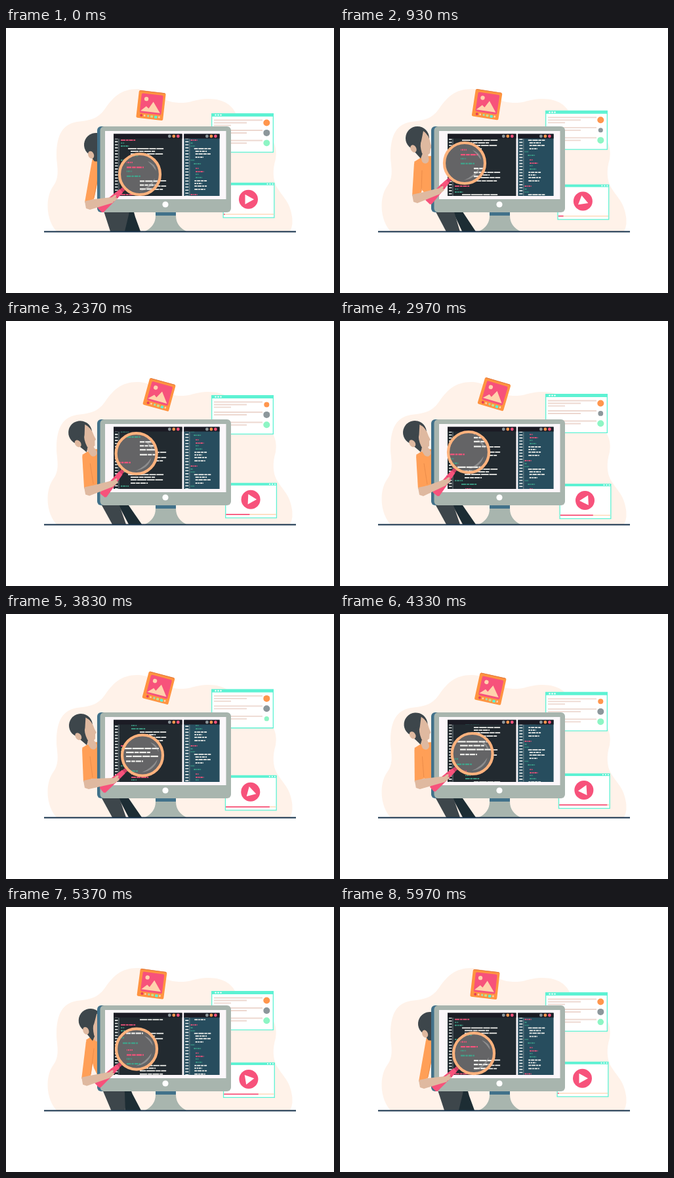
These frames come from a looping animation (500x404 px, 6 s). An HTML page with a canvas:

```html
<!DOCTYPE html>
<html>
<head>
<meta charset="utf-8">
<style>
html, body { margin: 0; width: 100%; height: 100%; overflow: hidden; background: #fff; }
canvas { display: block; width: 500px; height: 404px; }
</style>
</head>
<body>
<canvas id="stage" width="500" height="404"></canvas>
<script>
const canvas = document.getElementById('stage');
const c = canvas.getContext('2d');
const LOOP = 6000, PERIOD = 83, TAU = Math.PI * 2;
const PINK = '#f7527b', ORANGE = '#ff964d', MINT = '#5df2d3', SKIN = '#dfb9a0', HAIR = '#3d464b',
  TEAL = '#3fa58c', WHITE = '#f2f2ee', GREY = '#8c979b', PEACH = '#ffd2ad', NAVY = '#1d2d34',
  BODY = '#a8b5ae', SIDE = '#41718a', SHIRT = '#ff9f57';

// Code lines: offset, colour, left, right
const code = [
  [0, PINK, 175, 198], [4.5, TEAL, 175, 181], [9, TEAL, 175, 188],
  [13, WHITE, 186, 241], [17, WHITE, 190, 228], [21, WHITE, 190, 240], [26, WHITE, 190, 217],
  [30.5, TEAL, 175, 188], [36, TEAL, 185, 209], [43, PINK, 191, 201], [48, PINK, 191, 218],
  [52, TEAL, 191, 200], [57, TEAL, 191, 213],
  [62, WHITE, 204, 245], [66, WHITE, 204, 229], [70, WHITE, 204, 245], [75, WHITE, 204, 240]
];

// Pose: time, lens x y, handle angle, head x y, head tilt, shoulder x y, elbow x y, lean
const poses = [
  [0, 204, 223, 138, 137, 178, 5, 138, 206, 127, 270, 0],
  [930, 190, 206, 133, 118, 168, 0, 120, 209, 117, 260, .9],
  [1830, 201, 206, 131, 113, 170, -9, 123, 209, 125, 259, 1],
  [2970, 196, 200, 128, 114, 170, -8, 123, 209, 126, 260, 1],
  [3830, 208, 215.5, 139, 114, 170, -8, 123, 209, 125, 260, 1],
  [4830, 195, 210, 136.5, 119, 168, 0, 120, 209, 118, 261, .9]
];

const ease = x => (1 - Math.cos(Math.PI * Math.min(1, Math.max(0, x)))) / 2;
const mix = (a, b, k) => a + (b - a) * k;

function keyAt(i) {
  const n = poses.length, p = poses[(i + n) % n];
  return [p[0] + Math.floor(i / n) * LOOP, ...p.slice(1)];
}

// Smooth periodic curve through the poses
function poseAt(t) {
  let i = poses.length - 1;
  while (poses[i][0] > t) i--;
  const [a, b, d, e] = [i - 1, i, i + 1, i + 2].map(keyAt);
  const h = d[0] - b[0], u = (t - b[0]) / h, u2 = u * u, u3 = u2 * u;
  return b.slice(1).map((v, j) => {
    const k = j + 1;
    const m0 = (d[k] - a[k]) / (d[0] - a[0]) * h, m1 = (e[k] - b[k]) / (e[0] - b[0]) * h;
    return (2 * u3 - 3 * u2 + 1) * v + (u3 - 2 * u2 + u) * m0 + (3 * u2 - 2 * u3) * d[k] + (u3 - u2) * m1;
  });
}

function rect(x, y, w, h, fill, r = 0) {
  c.fillStyle = fill;
  c.beginPath();
  c.roundRect(x, y, w, h, r);
  c.fill();
}
function dot(x, y, r, fill) {
  c.fillStyle = fill;
  c.beginPath();
  c.arc(x, y, r, 0, TAU);
  c.fill();
}
function poly(fill, ...p) {
  c.fillStyle = fill;
  c.beginPath();
  for (let i = 0; i < p.length; i += 2) c.lineTo(p[i], p[i + 1]);
  c.closePath();
  c.fill();
}
function line(color, w, x1, y1, x2, y2, cap = 'butt') {
  c.strokeStyle = color;
  c.lineWidth = w;
  c.lineCap = cap;
  c.beginPath();
  c.moveTo(x1, y1);
  c.lineTo(x2, y2);
  c.stroke();
}
function group(x, y, deg, draw) {
  c.save();
  c.translate(x, y);
  c.rotate(deg * Math.PI / 180);
  draw();
  c.restore();
}
function clipTo(shape, draw) {
  c.save();
  c.beginPath();
  shape();
  c.clip();
  draw();
  c.restore();
}

function backdrop() {
  c.fillStyle = '#fff2e9';
  c.fill(new Path2D(`M77 310 C60 291 60 257 72 241 C84 225 76 207 77 190 C78 163 86 147 108 143
    C132 141 142 136 151 123 C164 104 177 92 203 93 C229 95 234 113 264 114 C282 115 287 108 309 108
    C333 108 346 119 351 132 C358 150 372 152 386 157 C408 164 414 181 411 200 C406 216 407 231 412 241
    C421 257 431 263 435 282 Q439 299 433 310 Z`));
}

function windowFrame(x, y, w, h, bar) {
  rect(x, y, w, h, MINT);
  rect(x + 1.3, y + bar, w - 2.6, h - bar - 1.3, '#fff');
}

function listWindow(y, t) {
  windowFrame(313, y, 95, 60, 5);
  for (const x of [319.5, 323.5, 327.5]) dot(x, y + 2.6, 1.2, '#fff');
  const phase = t % 2000 / 2000;
  const dip = at => {
    const d = Math.abs((phase - at + 1.5) % 1 - .5);
    return d < .12 ? ease(1 - d / .12) : 0;
  };
  [[ORANGE, .18, 1], [GREY, .44, 1.6], ['#8df5c4', .9, 1.4]].forEach(([color, at, depth], i) => {
    const row = y + 10.5 + i * 15.5;
    [74, 50, 26].slice(0, i ? 2 : 3).forEach((w, j) =>
      line('#edd8d0', 1.8, 317, row + j * 4, 317 + w, row + j * 4));
    dot(397.3, y + 14.5 + i * 15.4, 5 - depth * dip(at), color);
  });
}

function videoWindow(x, y, t) {
  windowFrame(x, y, 79, 54, 4);
  for (const d of [68, 72, 76]) dot(x + d, y + 2, 1, '#fff');
  dot(x + 39, y + 25.5, 14.5, PINK);
  group(x + 39, y + 25.5, 360 * ease(t / LOOP), () => poly('#fff', -5, -7.5, 8.5, 0, -5, 7.5));
  const done = t < 5000 ? ease(t / 5000) : 1 - ease((t - 5000) / 970);
  line('#ffdabb', 1.6, x + 1.3, y + 48.2, x + 77.7, y + 48.2);
  line(PINK, 1.8, x + 1.3, y + 48.2, x + 3 + 74.7 * done, y + 48.2);
}

function photoCard(x, y, deg) {
  group(x, y, deg, () => {
    rect(-20.5, -21, 41, 42, '#ff9440', 2);
    line('#e0793f', 1, -19, -20.6, 19, -20.6);
    rect(-16, -17, 33, 30, PINK, 2);
    dot(-8, -9, 3.2, PEACH);
    poly(PEACH, -15, 10, -7, 2, -3, 5, 3, -6, 15, 10);
    dot(-13, 16.5, 2, '#e83f58');
    dot(-8, 16.5, 1.4, PEACH);
    rect(-4, 15, 3, 3, '#9fe0b0', 1);
    rect(1, 15, 4, 3.4, '#c2e38c', 1);
    rect(7, 15, 4.5, 4, MINT, 1);
    rect(13, 15, 2.5, 3, PEACH, 1);
  });
}

function person(p) {
  const [, , , hx, hy, tilt, sx, sy, ex, ey, lean] = p;
  const leg = (fill, from, to) => poly(fill, ...from.map((v, i) => mix(v, to[i], lean)));
  leg(NAVY, [180, 270, 192, 270, 197, 288, 205, 310, 178, 310],
    [166, 270, 180, 270, 187, 281, 207, 310, 187, 310]);
  leg(HAIR, [146, 270, 190, 270, 187, 285, 181, 310, 159, 310],
    [140, 270, 165, 270, 173, 281, 183, 310, 162, 310]);
  poly(SHIRT, sx - 7, sy - 5, sx + 6, sy - 13, sx + 20, sy - 14, 172, 270, 146, 270, sx + 5, sy + 38);
  line(SKIN, 11, hx + 9, hy + 15, sx + 10, sy - 8, 'round');
  group(hx, hy, tilt, () => {
    dot(0, 0, 18, HAIR);
    poly(HAIR, -12, 10, -4, 21, 5, 31, 9, 20, 10, 0);
    c.fillStyle = SKIN;
    c.fill(new Path2D('M9 -11 Q18 -5 20 8 L22 14 L20 16 L19 23 Q14 28 7 23 Q3 10 6 4 Z'));
    c.beginPath();
    c.ellipse(-6, 16, 4.3, 6, -.5, 0, TAU);
    c.fill();
  });
  poly(SHIRT, sx - 7, sy - 3, sx + 8, sy - 2, ex + 7, ey - 9, ex - 7, ey - 4);
  line('#e78847', .8, sx + 5, sy + 8, ex + 7, ey - 11);
}

function codeLine(color, x1, x2, y, h, seed) {
  c.fillStyle = color;
  for (let x = x1, i = 0; x < x2; i++) {
    const w = Math.min((x2 - x1) * [.34, .2, .3, .25][(seed + i) % 4], x2 - x);
    c.fillRect(x, y - h / 2, Math.max(.8, w - h * .5), h);
    x += w;
  }
}

function scrollCode(top, scale, height, shift, place) {
  for (let n = 0; n < 3; n++) {
    code.forEach(([off, color, a, b], i) => {
      const y = top + scale * (off + n * PERIOD - shift);
      codeLine(color, place(a, off), place(b, off), y, height, i);
    });
  }
}

function panel(x, w, bg, gutter, shift, place) {
  rect(x, 161.5, w, 94.5, bg);
  clipTo(() => c.rect(x, 168.5, w, 87.5), () => {
    for (let i = 0; i < 40; i++)
      rect(x + 2, 168 + i * PERIOD / 18 - shift, gutter - 3.5, 1.6, '#e9edeb');
    line('#89969a', .8, x + gutter, 168, x + gutter, 256);
    scrollCode(171, 1, 1.7, shift, place);
  });
  rect(x, 161.5, w, 7, '#1b1b24');
  [GREY, ORANGE, PINK].forEach((color, i) => dot(x + w - 19.2 + i * 6.5, 165, 2.4, color));
}

function monitor(shift) {
  rect(228, 278, 31, 9, SIDE);
  c.fillStyle = BODY;
  c.fill(new Path2D('M228 286 H259 Q259 302 275 310 H212 Q228 302 228 286 Z'));
  rect(139, 150, 60, 131, SIDE, 6);
  rect(143.5, 150, 199.5, 131, BODY, 6);
  rect(151, 157, 184.5, 104, '#fcf7fa');
  dot(243, 269, 4.6, '#fff');
  panel(164, 104.5, '#222a30', 8, shift, x => x);
  panel(271.3, 54.3, '#274d5e', 8.5, shift, (x, off) => 281.5 + (x - 175 - (off > 60 ? 17 : 0)) * .48);
}

function magnifier(p, shift) {
  const [x, y, deg, , , , , , ex, ey] = p;
  dot(x, y, 31, '#646466');
  clipTo(() => c.arc(x, y, 29, 0, TAU), () => {
    scrollCode(140.5, 1.5, 2.2, shift, (v, off) => v - (off > 60 ? 0 : 7));
    c.fillStyle = 'rgba(190,190,190,.45)';
    c.fill(new Path2D(`M${x + 12} ${y - 20} q12 4 13 15 q-5 -8 -13 -15 Z
      M${x + 23} ${y + 6} q-4 17 -24 20 q15 -6 24 -20 Z`));
  });
  c.strokeStyle = '#ffb27d';
  c.lineWidth = 4.2;
  c.beginPath();
  c.arc(x, y, 31, 0, TAU);
  c.stroke();

  group(x, y, deg, () => {
    rect(33, -3, 8, 6, '#cf3e65');
    poly(PINK, 38, -3.5, 51, -4.5, 80, -6, 82, -4, 82, 5, 80, 6, 51, 4.5, 38, 3.5);
    line('#d93d68', 1, 49, -4.5, 49, 4.5);
  });

  const a = deg * Math.PI / 180;
  const hx = x + 57 * Math.cos(a), hy = y + 57 * Math.sin(a);
  poly(SKIN, ex - 7, ey - 6, ex + 7, ey - 9, hx - 3, hy - 3, hx + 2, hy + 5, ex + 1, ey + 7, ex - 5, ey + 5);
  line(SKIN, 7, hx - 4, hy + 1, hx + 2, hy, 'round');
  line(SKIN, 3.4, hx, hy - 1, hx + 5, hy - 5, 'round');
  line(SKIN, 3.4, hx + 1, hy + 2, hx + 6, hy - 1, 'round');
}

function draw(t) {
  const float = ease(t / 3000) * (t < 3000) + ease((LOOP - t) / 3000) * (t >= 3000);
  const shift = PERIOD * t / LOOP;
  const pose = poseAt(t);
  c.fillStyle = '#fff';
  c.fillRect(0, 0, 500, 404);
  backdrop();
  listWindow(130 - 19 * float, t);
  videoWindow(330.5 + 4 * float, 235.8 + 12.2 * float, t);
  photoCard(221 + 14 * float, 118 - 6.3 * float, 6.5 + 10 * float);
  person(pose);
  monitor(shift);
  line('#14304a', 2, 58, 310.5, 442, 310.5);
  magnifier(pose, shift);
}

function tick() {
  draw(performance.now() % LOOP);
  requestAnimationFrame(tick);
}
tick();
</script>
</body>
</html>
```
